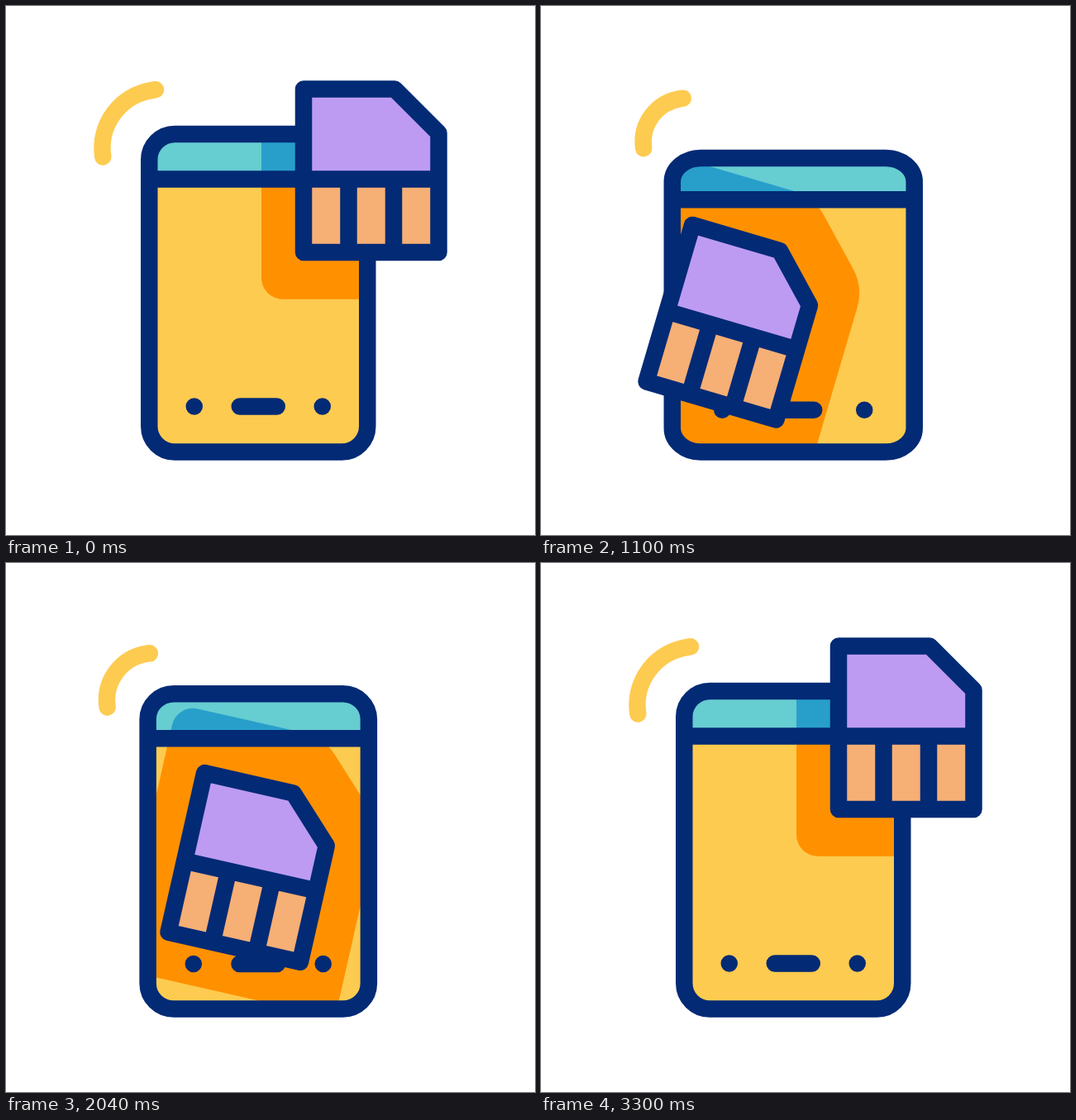
Animation of 640x640 px, one loop 3.6 s. Source, as an HTML page with a canvas:

```html
<!DOCTYPE html>
<html lang="en">
<head>
<meta charset="utf-8">
<title>SIM card and phone</title>
<style>
html, body { margin: 0; width: 100%; height: 100%; overflow: hidden; background: #fff; }
canvas { display: block; width: 640px; height: 640px; }
</style>
</head>
<body>
<canvas id="stage" width="640" height="640"></canvas>
<script>
const ctx = document.getElementById('stage').getContext('2d');
const LOOP = 3600, STROKE = 20.5;
const NAVY = '#032a75', TEAL = '#66cdd1', BLUE = '#289fcb', YELLOW = '#fdcb50',
      ORANGE = '#ff9100', PURPLE = '#bd9bf2', PEACH = '#f6af75';

const clamp = v => Math.min(1, Math.max(0, v));
const span = (t, a, b) => clamp((t - a) / (b - a));
const smooth = x => x * x * (3 - 2 * x);
const cubic = (a, b, c, d, s) => {
  const r = 1 - s;
  return a * r * r * r + 3 * b * r * r * s + 3 * c * r * s * s + d * s * s * s;
};

// Timing curve with control points (x1, 0) and (x2, 1)
function ease(x, x1, x2) {
  if (x <= 0 || x >= 1) return clamp(x);
  let lo = 0, hi = 1;
  for (let i = 0; i < 30; i++) {
    const mid = (lo + hi) / 2;
    if (cubic(0, x1, x2, 1, mid) < x) lo = mid; else hi = mid;
  }
  return cubic(0, 0, 1, 1, lo);
}

// Card centre travels along this curve at even arc length
const START = { x: 441.75, y: 199.25 };
const route = [];
for (let i = 0, len = 0; i <= 200; i++) {
  const s = i / 200;
  const x = START.x + cubic(0, -21, -112, -260.5, s);
  const y = START.y + cubic(0, 108, 193, 184.5, s);
  if (i) len += Math.hypot(x - route[i - 1].x, y - route[i - 1].y);
  route.push({ x, y, len });
}

function along(p) {
  const want = p * route[200].len;
  let i = 1;
  while (i < 200 && route[i].len < want) i++;
  const a = route[i - 1], b = route[i];
  const k = (want - a.len) / (b.len - a.len);
  return { x: a.x + (b.x - a.x) * k, y: a.y + (b.y - a.y) * k };
}

const cardProgress = t => t < 1600
  ? ease(span(t, 167, 1600), 0.856, 0.249)
  : 1 - ease(span(t, 1600, 3300), 0.45, 0.015);

const squash = t => t < 1167
  ? 33 * smooth(span(t, 867, 1167))
  : 33 * (1 - ease(span(t, 1167, 2700), 0.52, 0));

function arcScale(t) {
  const pulse = a => smooth(span(t, a, a + 767)) - smooth(span(t, a + 767, a + 1233));
  return 1 - 0.36 * (pulse(167) + pulse(1633));
}

function stroke(color) {
  ctx.lineWidth = STROKE;
  ctx.lineCap = ctx.lineJoin = 'round';
  ctx.strokeStyle = color;
  ctx.stroke();
}

function line(x1, y1, x2, y2) {
  ctx.moveTo(x1, y1);
  ctx.lineTo(x2, y2);
}

// Builds a path in a transformed space; the pen itself stays unscaled
function shape(move, build) {
  ctx.save();
  move();
  ctx.beginPath();
  build();
  ctx.restore();
}

function shadowPath() {
  const l = -132.75, r = 137.75, t = -172.75, b = 155.5, cut = 88;
  ctx.moveTo(0, b);
  ctx.arcTo(l, b, l, 0, 26);
  ctx.arcTo(l, t, 0, t, 26);
  ctx.arcTo(r - cut, t, r, t + cut, 62);
  ctx.arcTo(r, t + cut, r, b, 62);
  ctx.arcTo(r, b, 0, b, 26);
  ctx.closePath();
}

function drawPhone(grow, toCard) {
  const cx = 305.25, base = 539.5;
  const sx = (264 + grow) / 264, sy = (384.5 - grow) / 384.5;
  const toPhone = () => {
    ctx.translate(cx, base);
    ctx.scale(sx, sy);
    ctx.translate(-cx, -base);
  };
  const body = () => ctx.roundRect(173.25, 155, 264, 384.5, 31);
  const split = base - 330 * sy;

  ctx.save();
  shape(toPhone, body);
  ctx.clip();
  ctx.fillStyle = YELLOW;
  ctx.fillRect(0, split, 640, 640);
  ctx.fillStyle = TEAL;
  ctx.fillRect(0, 0, 640, split);
  for (const [color, y, h] of [[BLUE, 0, split], [ORANGE, split, 640 - split]]) {
    ctx.save();
    ctx.beginPath();
    ctx.rect(0, y, 640, h);
    ctx.clip();
    shape(toCard, shadowPath);
    ctx.fillStyle = color;
    ctx.fill();
    ctx.restore();
  }
  ctx.restore();

  shape(toPhone, () => {
    body();
    line(173.25, 209.5, 437.25, 209.5);
    line(227.75, 484.5, 227.76, 484.5);
    line(282.75, 484.5, 327.75, 484.5);
    line(382.75, 484.5, 382.76, 484.5);
  });
  stroke(NAVY);
}

function drawCard(toCard) {
  const w = 81.75, h = 98.75, mid = 10.25, cut = 53.25;
  const outline = () => {
    ctx.moveTo(-w, -h);
    ctx.lineTo(w - cut, -h);
    ctx.lineTo(w, cut - h);
    ctx.lineTo(w, h);
    ctx.lineTo(-w, h);
    ctx.closePath();
  };
  ctx.save();
  toCard();
  ctx.beginPath();
  outline();
  ctx.fillStyle = PURPLE;
  ctx.fill();
  ctx.fillStyle = PEACH;
  ctx.fillRect(-w, mid, 2 * w, h - mid);
  ctx.beginPath();
  outline();
  line(-w, mid, w, mid);
  for (const x of [-w / 3, w / 3]) line(x, mid, x, h);
  stroke(NAVY);
  ctx.restore();
}

function drawArc(k) {
  const px = 144.5, py = 142, rad = Math.PI / 180;
  ctx.beginPath();
  ctx.arc(px + 43 * k, py + 30 * k, 71 * k, 171.5 * rad, 264.8 * rad);
  stroke(YELLOW);
}

function draw(t) {
  const p = cardProgress(t), pos = along(p);
  const toCard = () => {
    ctx.translate(pos.x, pos.y);
    ctx.rotate(p * 19.25 * Math.PI / 180);
  };
  ctx.fillStyle = '#fff';
  ctx.fillRect(0, 0, 640, 640);
  drawArc(arcScale(t));
  drawPhone(squash(t), toCard);
  drawCard(toCard);
}

const begin = performance.now();
function tick() {
  draw((performance.now() - begin) % LOOP);
  requestAnimationFrame(tick);
}
tick();
</script>
</body>
</html>
```
